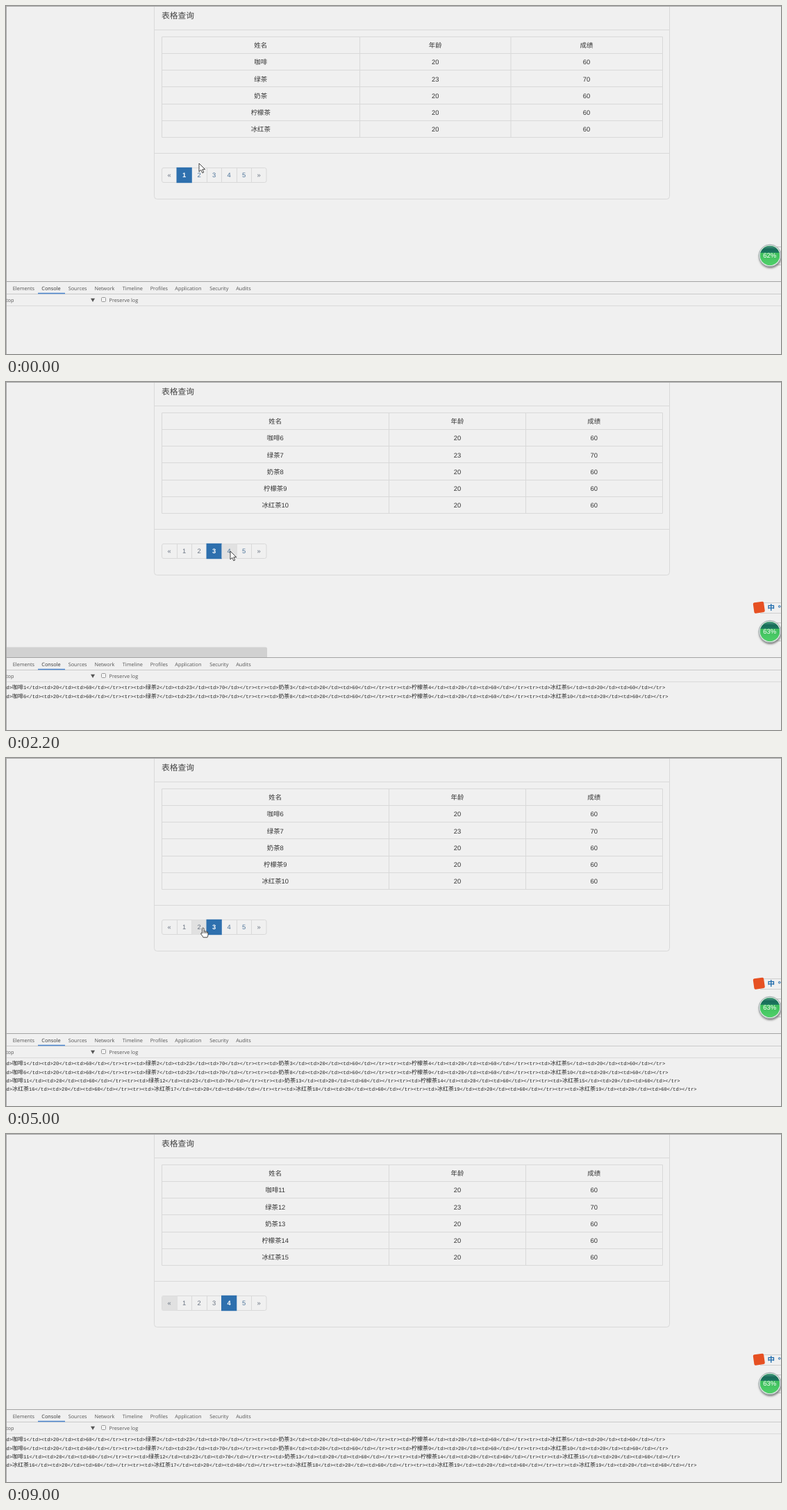
Write an HTML page that moves like this. It is 1116x502 px and loops after 9.2 s.

```html
<!DOCTYPE html>
<html lang="zh-CN">
<head>
<meta charset="utf-8">
<style>
html, body { margin: 0; width: 100%; height: 100%; overflow: hidden; background: #f0f0f0; }
svg { display: block; width: 1116px; height: 502px; text-rendering: geometricPrecision;
  font: 9.4px "Liberation Sans", "Noto Sans CJK SC", "Noto Sans CJK", sans-serif; }
.line { fill: none; stroke: #d9d9d9; }
.mid { text-anchor: middle; }
.tools { font: 7.3px "Open Sans", sans-serif; fill: #555; }
.log { font: 7.15px "Liberation Mono", "Noto Sans CJK SC", "Noto Sans CJK", monospace; fill: #222; white-space: pre; }
</style>
</head>
<body>
<svg viewBox="0 0 1116 502">
  <defs>
    <linearGradient id="deep" x2="0" y2="1"><stop stop-color="#4f9a86"/><stop offset=".5" stop-color="#176b58"/><stop offset="1" stop-color="#1d7a60"/></linearGradient>
    <linearGradient id="green" x2="0" y2="1"><stop stop-color="#35b457"/><stop offset="1" stop-color="#4fd069"/></linearGradient>
    <filter id="soft" x="-30%" y="-30%" width="160%" height="160%"><feGaussianBlur stdDeviation="1.5"/></filter>
    <path id="arrow" d="M0 0V12L2.8 9.4 4.8 13.8 6.7 13 4.8 8.7H8.7Z" fill="#fff" stroke="#333" stroke-width=".9"/>
    <path id="hand" d="M-1.2 8V.8Q0-.9 1.3.8V5Q2.7 4 3.5 5.3 4.9 4.5 5.6 5.9 7 5.3 7.3 7V10.2Q7.2 12 6.2 13.8H.4Q-.7 11.7-3.1 8.7-3.3 6.8-1.2 8ZM1.3 5V8M3.5 5.3V8M5.6 5.9V8" fill="#fff" stroke="#333" stroke-width=".9"/>
  </defs>

  <path class="line" d="M213.5 0V274.5Q213.5 278.5 217.5 278.5H951.5Q955.5 278.5 955.5 274.5V0M213.5 34.5H955.5M213.5 212.5H955.5"/>
  <text x="224" y="18.4" font-size="11.75" fill="#444">表格查询</text>
  <g id="table"></g>
  <g id="pages"></g>

  <path id="status" d="M0 382.5H374Q376 382.5 376 384.5V397H0Z" fill="#d1d1d1"/>
  <path d="M0 397.5H1116" stroke="#a3a3a3"/>
  <path d="M0 415.5H1116" stroke="#cacaca"/>
  <path d="M0 432.5H1116" stroke="#dadada"/>
  <path d="M46 414.5H85" stroke="#4c86d0" stroke-width="1.4"/>
  <g class="tools">
    <g id="tabs"></g>
    <text x="0" y="427">top</text>
    <text x="148.5" y="427">Preserve log</text>
  </g>
  <path d="M122 421.8H128L125 427Z" fill="#555"/>
  <rect x="137.5" y="420.5" width="6" height="6" rx="1" fill="#f4f4f4" stroke="#999"/>
  <g id="logs"></g>

  <g id="ime">
    <path d="M1086 318.5H1116M1086 333.5H1116" stroke="#cfcfcf"/>
    <rect x="1076.5" y="317.5" width="15.5" height="15.5" rx="2" fill="#e65022" transform="rotate(-8 1084 325)"/>
    <text x="1096.5" y="329.4" font-size="10.5" font-weight="bold" fill="#1c69ab">中</text>
    <circle cx="1113.7" cy="323.8" r="1.3" fill="none" stroke="#1c69ab"/>
  </g>
  <path d="M1106 347.5H1116M1106 373.5H1116" stroke="#c4c4c4"/>
  <circle cx="1100.5" cy="362" r="16" fill="#777" filter="url(#soft)"/>
  <circle cx="1100" cy="360" r="15.8" fill="#eee" stroke="#9aa"/>
  <circle cx="1100" cy="360" r="14.2" fill="url(#green)"/>
  <path d="M1086.4 356A14.2 14.2 0 0 1 1113.6 356Z" fill="url(#deep)"/>
  <text id="percent" class="mid" x="1099.7" y="362.6" font-size="9.5" fill="#fff"></text>
  <path d="M0 .5H1116M.5 0V502" stroke="#a8a8a8"/>
  <use id="cursor"/>
</svg>

<script>
const LOOP = 9200, STEP = 200;
const $ = id => document.getElementById(id);
const names = ['咖啡', '绿茶', '奶茶', '柠檬茶', '冰红茶'];

// [start ms, value]
const pageAt = [[0, 1], [800, 2], [1800, 3], [2400, 4], [3000, 5], [4200, 4], [4800, 3], [5600, 4],
  [6000, 5], [7000, 4], [7200, 3], [7400, 2], [7600, 1], [7800, 5], [8400, 4]];
const logsAt = [[0, 0], [1000, 1], [2000, 2], [2400, 3], [3200, 4]];
// [ms, x, y] of the pointer's hot spot
const path = [[0, 278, 227], [600, 280, 242], [1000, 280, 242], [1200, 282, 243], [1800, 302, 244],
  [2200, 323, 244], [2400, 341, 246], [2600, 342, 247], [3000, 342, 247], [3600, 240, 245],
  [4000, 240, 245], [4400, 241, 246], [4600, 241, 246], [5800, 369, 243], [6600, 369, 243],
  [7000, 242, 248], [8400, 242, 248], [8800, 23, 1], [9200, 23, 1]];

const held = (list, t) => list.findLast(k => k[0] <= t)[1];

function pointer(t) {
  const i = path.findIndex(k => k[0] > t);
  const [a, b] = [path[i - 1], path[i]];
  const p = (t - a[0]) / (b[0] - a[0]);
  return [1, 2].map(n => a[n] + (b[n] - a[n]) * p);
}

function rows(page) {
  return names.map((name, i) => {
    if (page === 5) return ['冰红茶' + Math.min(16 + i, 19), 20, 60];
    const n = page > 1 ? (page - 2) * 5 + i + 1 : '';
    return [name + n, i === 1 ? 23 : 20, i === 1 ? 70 : 60];
  });
}

function tableSvg(page) {
  const [a, b] = page === 1 ? [509.5, 727] : page === 2 ? [531.5, 738] : [551.5, 748.5];
  const centers = [(224 + a) / 2, (a + b) / 2, (b + 945) / 2];
  let lines = `M224.5 44.5H945.5V189.5H224.5ZM${a} 44.5V189.5M${b} 44.5V189.5`;
  let text = '';
  [['姓名', '年龄', '成绩'], ...rows(page)].forEach((row, r) => {
    if (r) lines += `M224.5 ${Math.floor(44.5 + r * 24.15) + .5}H945.5`;
    row.forEach((cell, c) => {
      text += `<text class="mid" x="${centers[c]}" y="${60.3 + r * 24.1}" fill="#333">${cell}</text>`;
    });
  });
  return `<path class="line" d="${lines}"/>` + text;
}

function pagesSvg(page, hover) {
  let fills = '', lines = '', text = '';
  [...'«12345»'].forEach((label, i) => {
    const x = 224.5 + i * 21.5, on = i === page;
    if (on || i === hover)
      fills += `<rect x="${x - (on ? .5 : 0)}" y="${on ? 232.8 : 233.5}" width="22.3" height="${on ? 22.4 : 21}" fill="${on ? '#2e70ae' : '#e1e1e1'}"/>`;
    if (i && !on && i !== page + 1) lines += `M${Math.floor(x) + .5} 233.5V254.5`;
    const plain = i % 6 === 0 || (page > 2 && i < page);
    const fill = on ? '#fff' : plain ? '#687280' : '#4b7399';
    text += `<text class="mid" x="${x + 10.7}" y="247.3" fill="${fill}"${on ? ' font-weight="bold"' : ''}>${label}</text>`;
  });
  return `<rect class="line" x="224.5" y="233.5" width="150.5" height="21" rx="2.5"/><path class="line" d="${lines}"/>` + fills + text;
}

function logSvg(page, i) {
  const line = 'd>' + rows(page).map(r => r.join('</td><td>') + '</td></tr>').join('<tr><td>');
  const body = line.replace(/</g, '&lt;').replace(/>/g, '&gt;')
    .replace(/[\u4e00-\u9fff]+/g, '<tspan font-size="8">$&</tspan>');
  return `<text class="log" x=".4" y="${443.2 + i * 12.4}">${body}</text>`;
}

$('tabs').innerHTML = Object.entries({ Elements: 9.7, Console: 51.3, Sources: 89.7, Network: 127.4, Timeline: 167.8,
  Profiles: 207.7, Application: 243.3, Security: 293.2, Audits: 331.2 })
  .map(([label, x]) => `<text x="${x}" y="409.5"${label === 'Console' ? ' fill="#333"' : ''}>${label}</text>`).join('');

const show = (id, on) => $(id).setAttribute('visibility', on ? 'visible' : 'hidden');

function draw(t) {
  const page = held(pageAt, t), [x, y] = pointer(t);
  const over = y > 233 && y < 255 ? Math.floor((x - 224) / 21.5) : -1;
  $('table').innerHTML = tableSvg(page);
  $('pages').innerHTML = pagesSvg(page, t >= 7000 ? 0 : over);
  $('logs').innerHTML = [2, 3, 4, 5].slice(0, held(logsAt, t)).map(logSvg).join('');
  $('percent').textContent = t < 600 ? '62%' : '63%';
  show('status', t >= 600 && t < 4800);
  show('ime', t >= 600);
  show('cursor', t < 9000);
  $('cursor').setAttribute('href', t < 2600 || t > 8400 ? '#arrow' : '#hand');
  $('cursor').setAttribute('transform', `translate(${x} ${y})`);
}

let last = -1;
function tick() {
  const t = Math.floor(performance.now() % LOOP / STEP) * STEP;
  if (t !== last) draw(last = t);
  requestAnimationFrame(tick);
}
tick();
</script>
</body>
</html>
```
